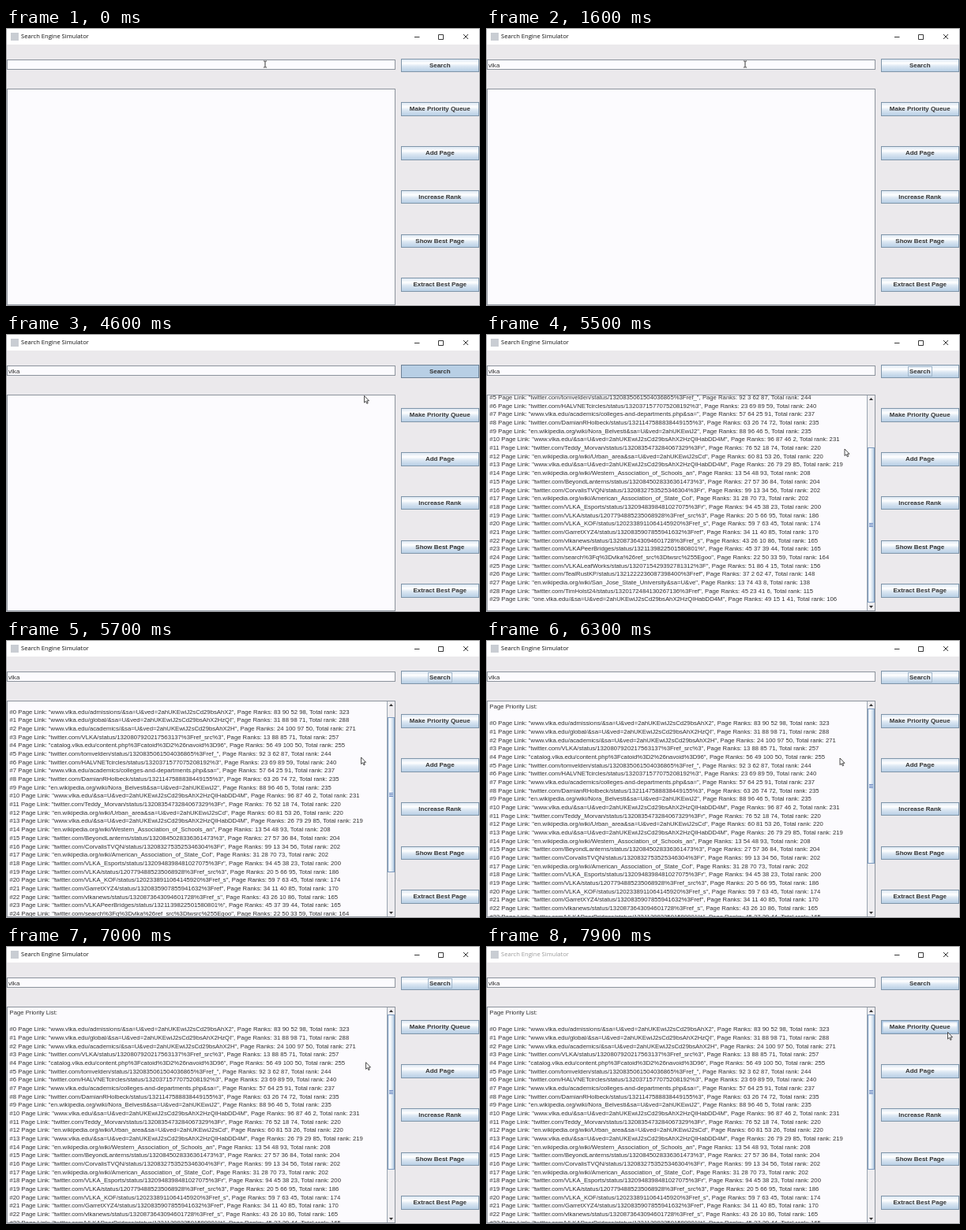
An HTML page for the animation above (8 s loop, 600 by 353 pixels).

```html
<!DOCTYPE html>
<html lang="en">
<head>
<meta charset="utf-8">
<title>Search Engine Simulator</title>
<style>
html, body { margin: 0; width: 100%; height: 100%; overflow: hidden; }
body { position: relative; background: #ebe9ec; color: #333; font: 7.73px/10.67px "Liberation Sans", Arial, sans-serif; }
div, pre, svg { position: absolute; box-sizing: border-box; margin: 0; }
#bar { left: 0; top: 0; width: 600px; height: 21px; background: #fff; border-top: 1px solid #999; }
#title { left: 19px; top: 0; font: 7.58px/21px "Open Sans", "Noto Sans", sans-serif; color: #111; white-space: pre; }
#icon { left: 6px; top: 6px; width: 10px; height: 10px; background: #c9cdd3; }
#edge { inset: 0; border: solid #a5a5a8; border-width: 0 1px 1px; }
.box { background: #fcfbfe; border: 1px solid #8c939c; overflow: hidden; }
#field { left: 1px; top: 40px; width: 492px; height: 13px; font-size: 8.1px; line-height: 14px; padding-left: 1px; }
#area { left: 1px; top: 77px; width: 492px; height: 275px; }
#list { left: 2.5px; font: inherit; }
.button { left: 500px; width: 98.5px; height: 17.5px; border: 1px solid #7f95a9; text-align: center;
  font-weight: bold; font-size: 7.95px; line-height: 16.5px;
  background: linear-gradient(#dde8f3, #fff 32%, #dde8f3 55%, #b8cfe5); }
.button span { padding: 1px 1.5px; }
.button.focus span { outline: 1px solid #a3b8cc; }
.button.hover { box-shadow: inset 0 0 0 1.5px #a9c4e0; }
.button.down { background: #b8cfe5; border-color: #6d8196; }
#scroll { right: 0; top: 0; width: 10px; height: 273px; background: #eeedf0; border-left: 1px solid #9aa5b1; }
#thumb { left: 0; width: 9px; height: 197px; border: 1px solid #7f9cbf; background: linear-gradient(90deg, #dde8f3, #fff 30%, #b8cfe5); }
#grip { left: 1px; top: 95px; width: 5px; height: 5px; background: repeating-linear-gradient(#6382bf 0 1px, #dde8f3 1px 2px); }
svg { left: 0; top: 0; width: 600px; height: 353px; fill: none; }
</style>
</head>
<body>
<div id="bar"></div>
<div id="icon"></div>
<div id="title">Search Engine Simulator</div>
<div id="field" class="box"></div>
<div id="area" class="box">
  <pre id="list"></pre>
  <div id="scroll">
    <div id="thumb"><div id="grip"></div></div>
    <svg><path fill="#333" d="M2 6h5l-2.5-3zM2 267h5l-2.5 3z"/></svg>
  </div>
</div>
<div id="edge"></div>
<svg>
  <path id="controls" stroke="#222" stroke-width=".9" d="M517 11.5h6.5M547.5 8.5h6v6h-6zM579 8l6 6M585 8l-6 6"/>
  <path id="beam" stroke="#222" stroke-width=".9" d="M-2 -4h1.5l.5 .5l.5 -.5h1.5M0 -3.5v7M-2 4h1.5l.5 -.5l.5 .5h1.5"/>
  <path id="arrow" fill="#fff" stroke="#222" stroke-width=".8" d="M0 0V8.6L2 6.8L3.4 9.9L4.7 9.3L3.4 6.3H6Z"/>
</svg>
<script>
const LOOP = 8000, STEP = 100, SCROLL_MAX = 78.6;
const $ = id => document.getElementById(id);

const term = "vlka";
const query = "&sa=U&ved=2ahUKEwiJ2sCd29bsAhX2HzQIHabDD4M";
const site = path => `www.${term}.edu/${path}${query}`;
const wiki = page => "en.wikipedia.org/wiki/" + page + query;
const tweet = (user, id) => `twitter.com/${user}/status/${id}%3Fref_src%3`;

const pages = [
  [site("admissions/"), "83 90 52 98"],
  [site("global/"), "31 88 98 71"],
  [site("academics/"), "24 100 97 50"],
  [tweet("VLKA", "1320807920217563137"), "13 88 85 71"],
  [`catalog.${term}.edu/content.php%3Fcatoid%3D2%26navoid%3D96`, "56 49 100 50"],
  [tweet("tomvelden", "1320835061504036865"), "92 3 62 87"],
  [tweet("HALVNETcircles", "1320371577075208192"), "23 69 89 59"],
  [site("academics/colleges-and-departments.php"), "57 64 25 91"],
  [tweet("DamianRHolbeck", "1321147588838449155"), "63 26 74 72"],
  [wiki("Nora_Belvesti"), "88 96 46 5"],
  [site(""), "96 87 46 2"],
  [tweet("Teddy_Morvan", "1320835473284067329"), "76 52 18 74"],
  [wiki("Urban_area"), "60 81 53 26"],
  [site(""), "26 79 29 85"],
  [wiki("Western_Association_of_Schools_an"), "13 54 48 93"],
  [tweet("BeyondLanterns", "1320845028336361473"), "27 57 36 84"],
  [tweet("CorvalisTVQN", "1320832753525346304"), "99 13 34 56"],
  [wiki("American_Association_of_State_Col"), "31 28 70 73"],
  [tweet("VLKA_Esports", "1320948398481027075"), "94 45 38 23"],
  [tweet("VLKA", "1207794885235068928"), "20 5 66 95"],
  [tweet("VLKA_KOF", "1202338911064145920"), "59 7 63 45"],
  [tweet("GarretXYZ4", "1320835907855941632"), "34 11 40 85"],
  [tweet("vlkanews", "1320873643094601728"), "43 26 10 86"],
  [tweet("VLKAPeerBridges", "1321139822501580801"), "45 37 39 44"],
  [`twitter.com/search%3Fq%3D${term}%26ref_src%3Dtwsrc%255Egoo`, "22 50 33 59"],
  [tweet("VLKALeafWorks", "1320715429392781312"), "51 86 4 15"],
  [tweet("TealRustKP", "1321222236087398400"), "37 2 62 47"],
  [wiki("San_Jose_State_University"), "13 74 43 8"],
  [tweet("TimHolst24", "1320172484130267136"), "45 23 41 6"],
  [`one.${term}.edu/${query}`, "49 15 1 41"],
];
$("list").textContent = "Page Priority List:\n\n" + pages.map(([link, ranks], i) => {
  const total = ranks.split(" ").reduce((sum, n) => sum + +n, 0);
  return `#${i} Page Link: "${link.slice(0, 55)}", Page Ranks: ${ranks}, Total rank: ${total}`;
}).join("\n");

const labels = ["Search", "Make Priority Queue", "Add Page", "Increase Rank", "Show Best Page", "Extract Best Page"];
const buttons = labels.map((label, i) => {
  const button = document.createElement("div");
  button.className = "button";
  button.style.top = 38.7 + i * 55.7 + "px";
  button.innerHTML = `<span>${label}</span>`;
  $("edge").before(button);
  return button;
});

// Pointer stops: time, x, y
const stops = [
  [0, 328, 46], [1800, 328, 46], [2700, 535.5, 41.5], [3100, 535.5, 41.5], [4000, 469, 62],
  [4600, 453.5, 78.5], [4800, 454, 146], [5500, 454, 146], [5800, 448, 150],
  [6900, 448, 150], [7600, 584.5, 109.5], [LOOP, 584.5, 109.5],
];

function pointerAt(t) {
  const i = stops.findIndex(stop => stop[0] > t);
  const [t0, x0, y0] = stops[i - 1], [t1, x1, y1] = stops[i];
  const p = (t - t0) / (t1 - t0), ease = p * p * (3 - 2 * p);
  return [x0 + (x1 - x0) * ease, y0 + (y1 - y0) * ease];
}

function draw(now) {
  const t = Math.floor(now % LOOP / STEP) * STEP;
  const between = (from, to) => t >= from && t < to;

  const typed = [700, 1100, 1200, 1400].filter(key => t >= key).length;
  $("field").textContent = term.slice(0, typed);

  const loaded = t >= 4800;
  const wheelTurns = Math.max(0, (t - 5500) / STEP);
  const offset = Math.max(0, SCROLL_MAX - wheelTurns * 32);
  $("list").hidden = $("scroll").hidden = !loaded;
  $("list").style.top = 2 - offset + "px";
  $("thumb").style.top = 9 + offset / SCROLL_MAX * 57 + "px";

  const [search, queue] = buttons;
  search.classList.toggle("down", between(2800, 4800));
  search.classList.toggle("focus", between(4800, 7700));
  queue.classList.toggle("down", between(7700, 7800));
  queue.classList.toggle("hover", t >= 7500);
  $("title").style.color = t >= 7800 ? "#999" : "#111";

  const [x, y] = pointerAt(t);
  const overField = x < 493 && y < 53;
  for (const id of ["beam", "arrow"]) {
    $(id).setAttribute("transform", `translate(${x} ${y})`);
    $(id).style.display = (id === "beam") === overField ? "" : "none";
  }
  requestAnimationFrame(() => draw(performance.now() - start));
}

const start = performance.now();
draw(0);
</script>
</body>
</html>
```
